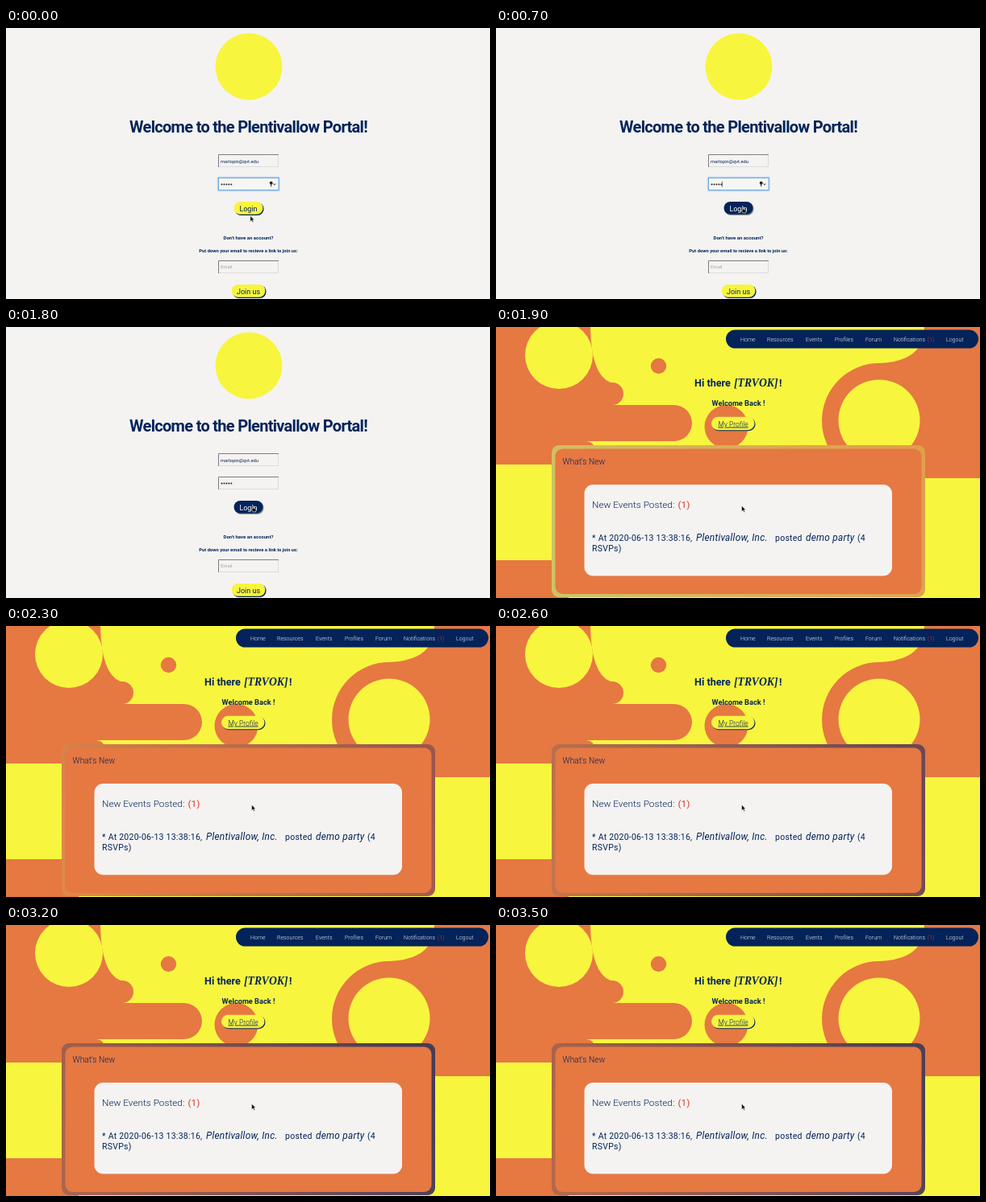
An HTML page that plays this animation: 600 by 337 pixels, repeating every 3600 ms.

```html
<!DOCTYPE html>
<html lang="en">
<head>
<meta charset="utf-8">
<title>Portal login</title>
<style>
  html, body { margin: 0; width: 100%; height: 100%; overflow: hidden; background: #f4f3f1; }
  svg { display: block; width: 100vw; height: 100vh; }
  text { font-family: Roboto, "Liberation Sans", sans-serif; fill: #03235a; }
  .mid { text-anchor: middle; }
  .bold { font-weight: 700; }
  .small { font-size: 5.8px; }
  .label { font-size: 9px; }
  .nav text { font-size: 7px; font-weight: 300; fill: #f1f1f1; }
  .nav .count, .red { fill: #d8352a; }
  .light { font-weight: 300; }
  .line { font-size: 10.5px; letter-spacing: .25px; }
  .name { font-size: 11.8px; letter-spacing: .25px; font-style: italic; }
  .navy { fill: #03235a; }
  .yellow { fill: #f8f53f; }
  .orange { fill: #e67842; }
  .paper { fill: #f4f3f1; }
  .edge { fill: none; stroke-width: 1; }
</style>
</head>
<body>
<svg viewBox="0 0 600 337">
  <defs>
    <linearGradient id="glow" x1="0" y1=".6" x2="1" y2=".4">
      <stop id="glowLeft" offset="0"/>
      <stop id="glowRight" offset="1"/>
    </linearGradient>
    <g id="field">
      <path class="edge" stroke="#7d7d7d" d="M.5 16V.5H75"/>
      <path class="edge" stroke="#dcdcda" d="M1 15.5H74.5V1"/>
    </g>
    <path id="arrow" d="M0 0V7.2L1.7 5.7L2.9 8.3L4.1 7.8L2.9 5.2H5.1Z" fill="#111" stroke="#fff" stroke-width=".5"/>
    <path id="hand" d="M1.5 0Q2.3 0 2.3.8V3L5 3.5Q5.8 3.8 5.6 5L5 7.6H1.7L0 5Q-.3 4.1.8 4.2V.8Q.8 0 1.5 0Z" fill="#111" stroke="#fff" stroke-width=".6"/>
  </defs>

  <g id="login">
    <rect class="paper" width="600" height="337"/>
    <circle class="yellow" cx="301" cy="48" r="41.5"/>
    <text class="mid bold" x="300.5" y="130" font-size="20" letter-spacing="-.7">Welcome to the Plentivallow Portal!</text>

    <use href="#field" x="263" y="157"/>
    <text x="266" y="167.5" class="small">marlopin@qvt.edu</text>
    <use href="#field" x="263" y="186"/>
    <g id="focus">
      <rect x="263" y="186" width="75.5" height="16" rx="1" fill="none" stroke="#b5d5f3" stroke-width="2.4"/>
      <rect x="263.5" y="186.5" width="74.5" height="15" fill="#f6f6f5" stroke="#5d9cd6" stroke-width=".8"/>
      <circle cx="328.7" cy="192.7" r="1.9" fill="#222"/>
      <path d="M328.7 193V197.2M331.3 193.6L332.8 195L334.3 193.6" fill="none" stroke="#222"/>
    </g>
    <path d="M267.5 194.4H279.5" stroke="#222" stroke-width="2" stroke-linecap="round" stroke-dasharray="0 2.95"/>
    <path id="caret" d="M280.3 191V197.5" stroke="#222" stroke-width=".7"/>

    <rect id="buttonEdge" x="283.4" y="217" width="36.2" height="16" rx="8"/>
    <rect id="button" x="282.5" y="216" width="36" height="15.8" rx="7.9"/>
    <text id="buttonText" class="mid label" x="300.5" y="227.7">Login</text>

    <text class="mid bold" x="300.5" y="263" font-size="6">Don't have an account?</text>
    <text class="mid bold small" x="300.5" y="278.8">Put down your email to recieve a link to join us:</text>
    <use href="#field" x="263" y="289"/>
    <text x="266" y="299.2" class="small" style="fill:#a3a3a3">Email</text>
    <rect class="navy" x="280.8" y="320" width="41.8" height="16" rx="8"/>
    <rect class="yellow" x="279.8" y="319" width="41.6" height="15.8" rx="7.9"/>
    <text class="mid label" x="300.5" y="330.8">Join us</text>
  </g>

  <g id="home">
    <rect class="yellow" width="600" height="337"/>
    <g class="orange">
      <path d="M0 0H117Q118 60 142 69H144A14 14 0 0 1 144 97H220.5A22.5 22.5 0 0 1 220.5 142H112Q122 143 123 153V171H0Z"/>
      <rect y="290" width="90" height="47"/>
      <circle cx="201.5" cy="48.5" r="9.7"/>
      <circle cx="285.5" cy="124" r="27"/>
      <path d="M475 45Q531 43 531 0H600V188H475A71 71.5 0 0 1 475 45Z"/>
    </g>
    <circle class="yellow" cx="475" cy="116" r="50.5"/>
    <circle class="yellow" cx="78" cy="35" r="42"/>

    <rect class="navy" x="285" y="3.5" width="313" height="23" rx="11.5"/>
    <g class="nav">
      <text x="303" y="18">Home</text>
      <text x="336" y="18">Resources</text>
      <text x="384" y="18">Events</text>
      <text x="420" y="18">Profiles</text>
      <text x="458" y="18">Forum</text>
      <text x="493" y="18">Notifications</text>
      <text x="535" y="18" class="count">(1)</text>
      <text x="558" y="18">Logout</text>
    </g>

    <text class="bold" x="246" y="74" font-size="12.6">Hi there</text>
    <text x="295" y="74" font-size="13.7" style="font:italic 700 13.7px 'Liberation Serif',serif">[TRVOK]</text>
    <text class="bold" x="351" y="74" font-size="12.6">!</text>
    <text class="mid bold" x="300.5" y="97.7" font-size="9.2">Welcome Back !</text>
    <rect class="navy" x="267.8" y="112.8" width="53.7" height="16.4" rx="8.2"/>
    <rect class="yellow" x="267" y="111.8" width="53.5" height="16.4" rx="8.2"/>
    <text class="mid light" x="294" y="123.6" font-size="8.5" text-decoration="underline">My Profile</text>

    <rect x="69" y="147" width="463" height="189" rx="9" fill="url(#glow)"/>
    <rect class="orange" x="73.5" y="151.5" width="454" height="180.5" rx="9"/>
    <text class="light" x="82.5" y="171" font-size="10.2">What's New</text>
    <rect class="paper" x="109.5" y="196" width="381.5" height="113.5" rx="11"/>
    <text class="light" x="119" y="225" font-size="11.8">New Events Posted:</text>
    <text class="red" x="225.5" y="225" font-size="11.8">(1)</text>
    <text class="line" x="119" y="265.5">* At 2020-06-13 13:38:16,</text>
    <text class="name" x="248" y="265.5">Plentivallow, Inc.</text>
    <text class="line" x="346" y="265.5">posted</text>
    <text class="name" x="384" y="265.5">demo party</text>
    <text class="line" x="448" y="265.5">(4</text>
    <text class="line" x="119" y="279">RSVPs)</text>
  </g>

  <g id="pointer">
    <use id="shape" href="#arrow"/>
  </g>
</svg>

<script>
  const LOOP = 3600, SWITCH = 1900;
  const el = id => document.getElementById(id);
  const show = (id, on) => el(id).style.display = on ? "" : "none";
  const mix = (a, b, k) => a + (b - a) * k;

  // Panel border: time, left colour, right colour
  const glow = [
    [1900, [207, 194, 100], [223, 160, 74]],
    [2300, [222, 136, 74], [154, 86, 80]],
    [2900, [164, 98, 78], [61, 57, 90]],
    [3500, [178, 104, 74], [75, 64, 84]],
    [3600, [180, 105, 74], [78, 66, 82]]
  ];

  function setGlow(t) {
    const i = glow.findIndex((key, n) => n && t <= key[0]);
    const [a, b] = [glow[i - 1], glow[i]];
    const k = (t - a[0]) / (b[0] - a[0]);
    const colour = side => `rgb(${a[side].map((v, c) => mix(v, b[side][c], k))})`;
    el("glowLeft").setAttribute("stop-color", colour(1));
    el("glowRight").setAttribute("stop-color", colour(2));
  }

  function draw(t) {
    const atLogin = t < SWITCH;
    const hover = atLogin && t >= 200;
    show("login", atLogin);
    show("home", !atLogin);

    show("focus", t < 1300);
    show("caret", t >= 600 && t < 1100);
    el("button").setAttribute("fill", hover ? "#03235a" : "#f8f53f");
    el("buttonEdge").setAttribute("fill", hover ? "#8f9488" : "#03235a");
    el("buttonText").style.fill = hover ? "#fff" : "#03235a";

    const k = Math.min(t / 400, 1), ease = k * (2 - k);
    const x = mix(302.8, 304.5, ease), y = mix(233.5, 222.3, ease);
    el("pointer").setAttribute("transform", `translate(${x} ${y})`);
    el("shape").setAttribute("href", hover ? "#hand" : "#arrow");

    if (!atLogin) setGlow(t);
  }

  const start = performance.now();
  function tick() {
    draw((performance.now() - start) % LOOP);
    requestAnimationFrame(tick);
  }
  tick();
</script>
</body>
</html>
```
